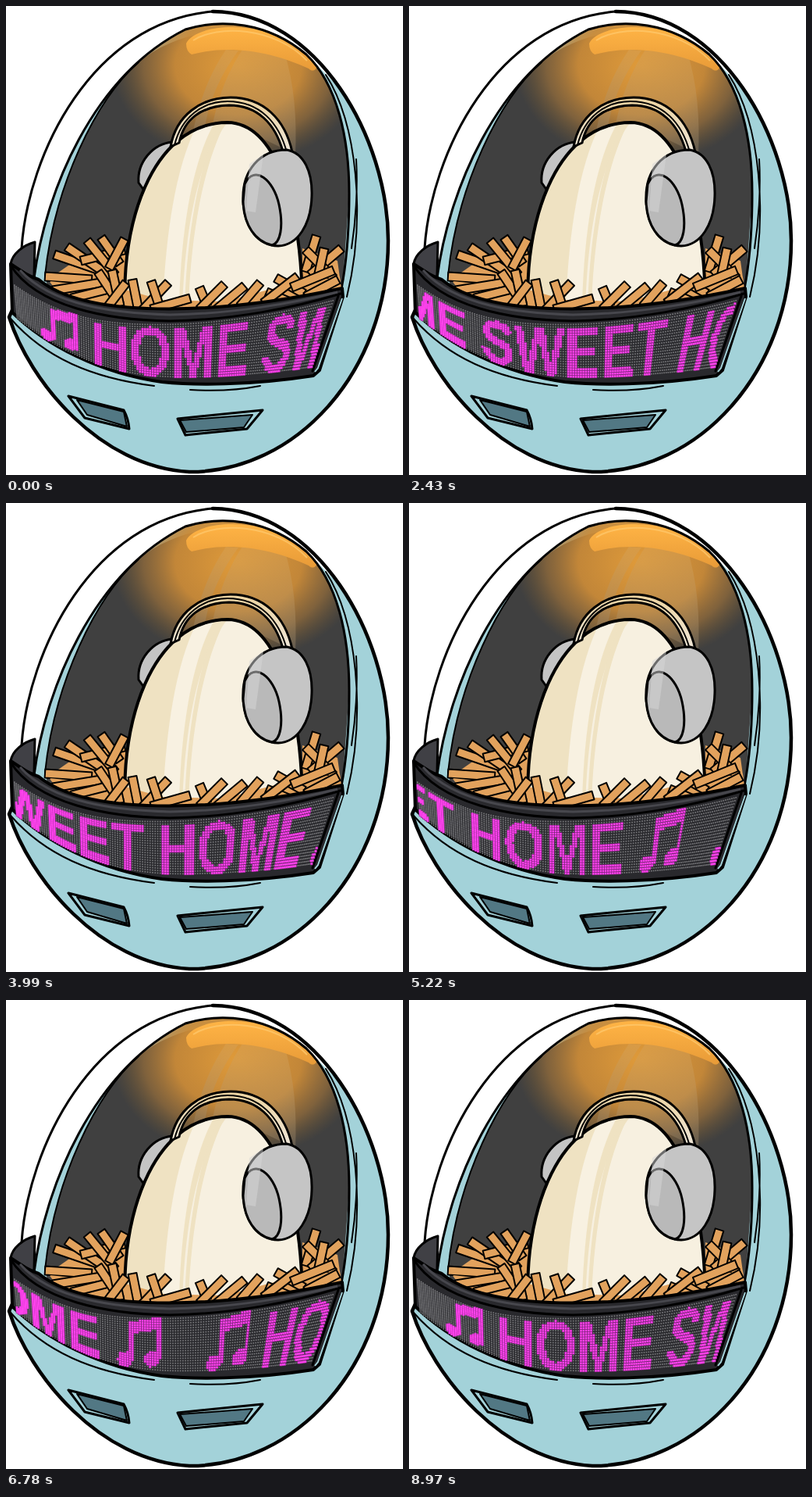
An HTML page with a canvas that plays this animation: 509 by 600 pixels, repeating every 9 s.

```html
<!DOCTYPE html>
<html lang="en">
<head>
<meta charset="utf-8">
<title>Egg incubator</title>
<style>
  html, body { margin: 0; width: 100%; height: 100%; overflow: hidden; background: #fff; }
  svg, canvas { position: absolute; left: 0; top: 0; width: 509px; height: 600px; }
  .line { fill: none; stroke: #000; stroke-linecap: round; stroke-linejoin: round; }
  .ink { stroke: #000; stroke-width: 3; stroke-linejoin: round; stroke-linecap: round; }
</style>
</head>
<body>
<svg viewBox="0 0 509 600">
  <defs>
    <radialGradient id="glow">
      <stop offset="0" stop-color="#e09b3a"/>
      <stop offset=".5" stop-color="#c98a38" stop-opacity=".95"/>
      <stop offset=".75" stop-color="#a9783a" stop-opacity=".6"/>
      <stop offset="1" stop-color="#80602f" stop-opacity="0"/>
    </radialGradient>
    <linearGradient id="lamp" x1="0" x2="0" y1="0" y2="1">
      <stop offset="0" stop-color="#ffb445"/>
      <stop offset="1" stop-color="#e89b38"/>
    </linearGradient>
    <linearGradient id="haze" x1="0" x2="0" y1="0" y2="1">
      <stop offset="0" stop-color="#d9a050" stop-opacity=".55"/>
      <stop offset="1" stop-color="#9c8a70" stop-opacity=".35"/>
    </linearGradient>
    <linearGradient id="band" x1="0" x2="0" y1="0" y2="1">
      <stop offset="0" stop-color="#ecd3a0"/>
      <stop offset="1" stop-color="#eee6d8"/>
    </linearGradient>
    <clipPath id="window">
      <path d="M36 348C50 240 110 90 230 30C275 16 335 20 385 62C425 100 440 170 440 240L430 380H50Z"/>
    </clipPath>
    <clipPath id="shell">
      <path id="eggClip" d="M153 380C148 290 182 150 284 149C345 150 378 250 380 380Z"/>
    </clipPath>
  </defs>

  <!-- body and glass -->
  <path d="M20 310C28 190 110 20 265 7C400 8 490 170 490 300C490 470 370 597 235 596C120 590 30 480 4 398L8 389Z" fill="#a3d2d9"/>
  <path d="M20 310C28 190 110 20 265 7C332 8 389 48 428 105L385 62C335 20 275 16 230 30C110 90 50 240 36 348Z" fill="#fff"/>
  <path d="M50 345C62 230 115 120 170 72C225 25 330 15 385 62C425 100 440 180 440 240L430 380H58Z" fill="#404040"/>
  <g clip-path="url(#window)">
    <ellipse cx="298" cy="76" rx="162" ry="126" fill="url(#glow)"/>
    <path d="M282 56C268 76 250 110 240 160L255 155C262 115 278 84 298 57Z" fill="url(#haze)"/>
    <path d="M303 56H356C370 100 373 145 371 190L330 170H262C268 125 283 86 303 56Z" fill="url(#haze)"/>
  </g>
  <path d="M231 48C243 20 350 12 398 76C399 82 393 85 388 80C345 60 290 48 238 62Q231 58 231 48Z" fill="url(#lamp)"/>
  <path d="M240 44C270 24 345 26 386 70" fill="none" stroke="#ffca70" stroke-width="2" opacity=".7"/>
  <path class="line" d="M50 345C62 230 115 120 170 72" stroke-width="2"/>
  <path class="line" d="M36 348C50 240 110 90 230 30C275 16 335 20 385 62C425 100 440 170 440 240Q440 310 430 362" stroke-width="3"/>
  <path class="line" d="M410 88C450 150 462 270 437 372M449 196Q452 250 443 310" stroke-width="2"/>
  <path class="line" d="M20 310C28 190 110 20 265 7" stroke-width="3"/>
  <path class="line" d="M265 7C400 8 490 170 490 300C490 470 370 597 235 596C120 590 30 480 4 398L8 389" stroke-width="4.5"/>

  <!-- nest behind, egg, headphones, nest in front -->
  <g id="back"></g>
  <path class="ink" d="M170 226C168 200 188 176 214 174L222 190L180 240Z" fill="#c4c4c4"/>
  <g clip-path="url(#shell)">
    <rect x="140" y="140" width="250" height="245" fill="#efe2c2"/>
    <path d="M284 149C250 190 230 270 226 385H390V140Z" fill="#f7f0e0"/>
    <path d="M246 150C220 200 205 280 201 385H222C224 290 238 200 268 148Z" fill="#f8f1e1"/>
    <path d="M274 148C248 200 232 290 229 385H234C237 290 254 200 282 148Z" fill="#efe2c2"/>
  </g>
  <path class="line" d="M153 380C148 290 182 150 284 149C345 150 378 250 380 380" stroke-width="4"/>
  <path class="ink" d="M211 180C218 140 250 117 288 117C330 117 358 145 367 187L355 186C345 150 322 127 286 127C250 128 228 145 222 175Z" fill="url(#band)"/>
  <path class="line" d="M216 178C225 142 252 122 284 122C326 122 350 150 360 187" stroke-width="2"/>
  <path class="ink" d="M304 250C302 210 326 184 360 184C382 188 393 212 392 243C391 280 374 306 349 307C323 306 306 285 304 250Z" fill="#c5c5c5"/>
  <path class="ink" d="M306 228C318 202 343 222 350 254C356 282 352 303 341 306C320 301 305 281 304 250Z" fill="#b9b9b9" stroke-width="2"/>
  <path d="M312 202L330 190L320 264L308 262Z" fill="#d8d8d8" opacity=".5"/>
  <g id="front"></g>

  <!-- collar -->
  <path class="ink" d="M6 330C8 317 22 306 37 302L36 345L26 352Z" fill="#404045"/>
  <path class="ink" d="M6 330C24 342 30 346 42 350C100 398 260 398 431 361L432 372L402 466L394 473C310 486 240 485 200 481C120 470 50 433 8 392Z" fill="#29292d" style="stroke-width:4"/>
  <path class="line" d="M6 332C40 385 130 402 210 403C290 402 370 386 429 368" stroke-width="3"/>
  <path d="M18 338C60 384 140 393 210 395C290 394 370 380 425 366" fill="none" stroke="#47474d" stroke-width="3"/>
  <path class="line" d="M426 371L393 467" stroke-width="3"/>
  <path d="M431 374L400 463L396 468" fill="none" stroke="#a3d2d9" stroke-width="2"/>

  <!-- lower body -->
  <path class="line" d="M6 400C50 450 110 476 190 486M236 491Q285 494 326 486" stroke-width="2"/>
  <path class="ink" d="M80 499L151 517Q157 528 158 541L101 527Z" fill="#a3d2d9"/>
  <path class="ink" d="M91 504L151 519L155 538L104 523Z" fill="#527884" style="stroke-width:2"/>
  <path class="ink" d="M220 528L329 517L309 541L230 549Z" fill="#a3d2d9"/>
  <path class="ink" d="M223 530L316 523L305 539L231 545Z" fill="#527884" style="stroke-width:2"/>
</svg>
<canvas id="led" width="509" height="600"></canvas>

<script>
const LOOP = 9000, STEP = 30;

// straws: x1, y1, x2, y2
const backStraws = [
  [62,318,120,338], [78,308,134,346], [96,326,152,312], [104,300,140,344], [122,296,146,330],
  [50,346,110,350], [152,298,132,336], [398,294,384,340], [430,310,390,344], [384,312,420,348], [408,310,398,356]
];
const frontStraws = [
  [60,364,122,354], [84,374,140,360], [118,340,146,382], [136,338,146,384], [154,354,128,388],
  [162,350,170,390], [208,354,174,390], [186,352,198,388], [236,374,186,388], [248,360,258,384],
  [280,356,248,388], [306,358,270,388], [326,354,300,384], [334,366,362,378], [346,348,382,368],
  [374,346,330,380], [420,338,366,360], [426,350,384,372]
];
const hay = 'fill="#e2a25d" stroke="#000" stroke-width="2" stroke-linejoin="round"';

function straw([x1, y1, x2, y2]) {
  const len = Math.hypot(x2 - x1, y2 - y1), w = 5.5;
  const nx = (y1 - y2) / len * w, ny = (x2 - x1) / len * w;
  return `<path ${hay} d="M${x1 + nx} ${y1 + ny}L${x1 - nx} ${y1 - ny}L${x2 - nx} ${y2 - ny}L${x2 + nx} ${y2 + ny}Z"/>`;
}
const mound = d => `<path d="${d}" fill="#e2a25d"/>`;
document.getElementById('back').innerHTML =
  mound('M54 350L100 318L153 316V385H80ZM380 310L425 326L430 362L380 380Z') + backStraws.map(straw).join('');
document.getElementById('front').innerHTML =
  mound('M56 352L150 362L200 376L280 378L340 362L428 346L430 366L300 392L120 392Z') + frontStraws.map(straw).join('');

// flat strip holding the message; one period long
const PERIOD = 911, TALL = 52, ROWS = 22, PITCH = 3.25;
const strip = Object.assign(document.createElement('canvas'), { width: PERIOD, height: TALL });
const s = strip.getContext('2d', { willReadFrequently: true });

function note(x) {
  for (const [cx, cy] of [[x + 11, 44], [x + 46, 41]]) {
    s.beginPath();
    s.ellipse(cx, cy, 11, 7, -0.3, 0, 7);
    s.fill();
  }
  s.fillRect(x + 16, 8, 6, 36);
  s.fillRect(x + 51, 4, 6, 37);
  s.beginPath();
  s.moveTo(x + 16, 5);
  s.lineTo(x + 57, 0);
  s.lineTo(x + 57, 12);
  s.lineTo(x + 16, 17);
  s.fill();
}
note(0);
s.font = 'bold 69px "Liberation Sans", Arial, sans-serif';
s.fillText('HOME SWEET HOME', 75, 50.5);
note(795);
const ink = s.getImageData(0, 0, PERIOD, TALL).data;

// curved screen: strip position -> column from top to bottom edge
const sag = (d, left, lw, lp, right, rw, rp) =>
  d < 0 ? left * (-d / lw) ** lp : right * (d / rw) ** rp;
const topY = x => 406 - sag(x - 200, 54, 195, 2.7, 31, 219, 1.8);
const lowY = x => 476 - sag(x - 225, 76, 211, 2.2, 13, 170, 1.9);

const dots = [];
for (let u = -212; u < 230; u += PITCH) {
  const d = 280 * Math.sin(u / 280), x = 205 + d;
  const lean = d < 0 ? -2 * (d / 195) ** 2 : 15 * (d / 205) ** 2;
  if (x < 11 || x > 407) continue;
  const xt = x + lean, xb = x - lean, yt = topY(xt), yb = lowY(xb);
  for (let r = 0; r < ROWS; r++) {
    const v = (r + 0.5) / ROWS;
    dots.push({ u, row: Math.floor(v * TALL), x: xt + (xb - xt) * v, y: yt + (yb - yt) * v });
  }
}

const g = document.getElementById('led').getContext('2d');

function square(list, size, color) {
  g.fillStyle = color;
  for (const p of list) g.fillRect(p.x - size / 2, p.y - size / 2, size, size);
}

function draw(t) {
  const shift = 172 + t / LOOP * PERIOD;
  const on = [], off = [];
  for (const p of dots) {
    const col = Math.floor((p.u + shift + PERIOD) % PERIOD);
    (ink[(p.row * PERIOD + col) * 4 + 3] > 110 ? on : off).push(p);
  }
  g.clearRect(0, 0, 509, 600);
  square(off, 1.7, '#77777a');
  square(on, 3.5, '#8a2787');
  square(on, 2.4, '#ff43ee');
}

const start = performance.now();
let last = -1;
function tick() {
  const t = Math.floor((performance.now() - start) % LOOP / STEP) * STEP;
  if (t !== last) draw(last = t);
  requestAnimationFrame(tick);
}
tick();
</script>
</body>
</html>
```
